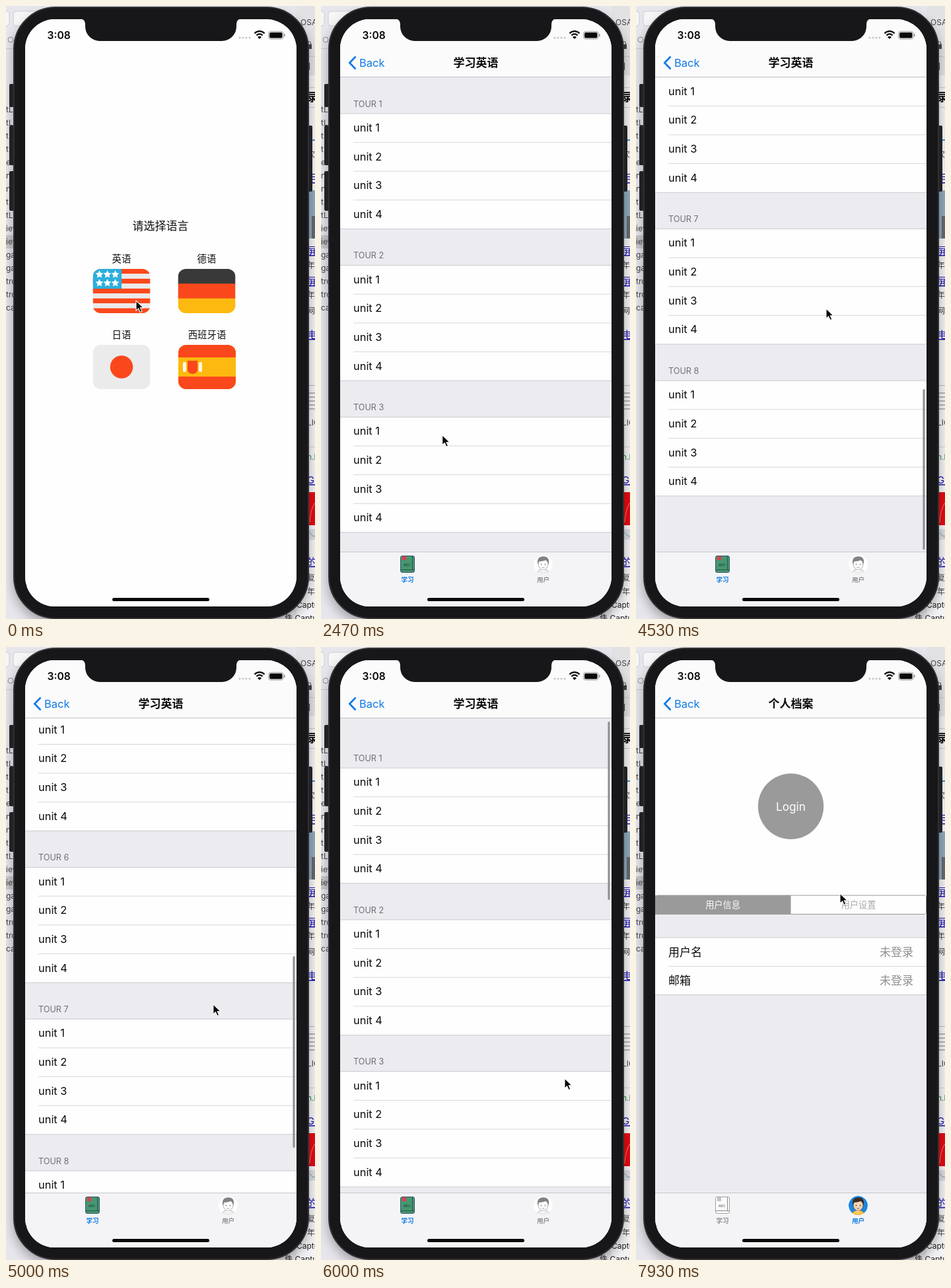
Write an HTML page that moves like this. It is 468 px wide and 928 px high and loops after 8000 ms.

```html
<!DOCTYPE html>
<html lang="zh">
<head>
<meta charset="utf-8">
<title>语言学习</title>
<style>
  html, body { margin: 0; width: 100%; height: 100%; overflow: hidden; background: #e6e6ec; }
  svg { display: block; width: 468px; height: 928px; font-family: Inter, "Noto Sans CJK SC", "Noto Sans CJK", sans-serif; }
  .mid { text-anchor: middle; }
  .end { text-anchor: end; }
  .cell { font-size: 16.4px; fill: #0c0c0c; }
  .head { font-size: 12.6px; fill: #6f6f74; }
  .title { font-size: 17px; font-weight: 700; fill: #0c0c0c; }
  .tab { font-size: 9.6px; font-weight: 700; }
  .side { font-size: 12px; fill: #444448; }
  .link { font-size: 15px; fill: #1a12b0; text-decoration: underline; }
</style>
</head>
<body>
<svg viewBox="0 0 468 928" xmlns="http://www.w3.org/2000/svg">
  <defs>
    <clipPath id="screenClip"><path d="M29 65a45 45 0 0 1 45-45H394a46 46 0 0 1 46 45V863a46 46 0 0 1-46 46H74a45 45 0 0 1-45-46Z"/></clipPath>
    <clipPath id="listClip"><rect x="29" y="108" width="411" height="718"/></clipPath>
    <clipPath id="flagClip"><rect width="87" height="67" rx="12"/></clipPath>
    <clipPath id="faceClip"><circle r="14.5"/></clipPath>
    <filter id="shadow" x="-20%" y="-10%" width="140%" height="120%"><feGaussianBlur stdDeviation="9"/></filter>
  </defs>
  <g id="desktop"></g>
  <g id="body"></g>
  <g clip-path="url(#screenClip)">
    <rect x="29" y="20" width="411" height="889" fill="#fefefe"/>
    <g id="home"></g>
    <g id="app">
      <rect x="29" y="20" width="411" height="889" fill="#ebebf0"/>
      <g id="study">
        <g clip-path="url(#listClip)">
          <g id="rows"></g>
          <rect id="bar" x="434.5" width="3" rx="1.5" fill="#8e8e90"/>
        </g>
      </g>
      <g id="profile"></g>
      <g id="chrome"></g>
    </g>
    <g id="status"></g>
  </g>
  <path id="cursor" d="M0 0V15.2L3.6 11.9L6.2 17.6L8.9 16.4L6.4 10.9H11.2Z" fill="#050505" stroke="#fff" stroke-width="1.1"/>
</svg>
<script>
const $ = id => document.getElementById(id);
const DURATION = 8000, PUSH_START = 400, PUSH_TIME = 500, TAB_SWITCH = 6900;
const SECTION = 229.75, ROW = 43.65, MAX_SCROLL = 1157;
const WHITE = '#fefefe', GROUP = '#ebebf0', BLACK = '#17171a', BLUE = '#0f7be4', GREY = '#8e8e92', BUTTON = '#9a9a9a', BORDER = '#cbcbcf';

const rect = (x, y, w, h, fill, extra = '') =>
  `<rect x="${x}" y="${y}" width="${w}" height="${h}" fill="${fill}" ${extra}/>`;
const text = (x, y, string, cls, extra = '') =>
  `<text x="${x}" y="${y}" class="${cls}" ${extra}>${string}</text>`;
const line = (x, y, color = '#d8d8db') => rect(x, y - .5, 440 - x, 1, color);

function drawDesktop() {
  const files = ['tLa', 'tLa', 'tLa', 'tLa', 'er', 'n', 'n', 'tLa', 'tLa', 'iew', 'iew', 'gar', 'gar', 'tro', 'tro', 'ca'];
  let out = rect(0, 0, 468, 928, '#e6e6ec')
    + rect(-8, 8, 13, 22, '#f6f6f7', 'rx="4" stroke="#cdcdd0"')
    + rect(11, 8, 40, 22, '#f6f6f7', 'rx="4" stroke="#cdcdd0"')
    + '<circle cx="7" cy="51" r="4" fill="none" stroke="#8c8c90"/>'
    + rect(0, 64, 30, 1, '#cacace') + rect(0, 347, 30, 20, '#c8c8cc')
    + files.map((name, i) => text(0, 161 + i * 20, name, 'side')).join('');
  out += rect(440, 0, 28, 928, '#f3f3f5') + rect(440, 0, 28, 105, '#e2e2e5')
    + text(446, 29, 'OSA', 'side')
    + rect(456, 58, 7, 7, '#444448') + '<path d="M457.5 58v-2a2 2 0 0 1 4 0v2" fill="none" stroke="#444448"/>'
    + rect(440, 76, 28, 1, '#cacace') + rect(440, 123, 28, 1, '#cacace') + rect(440, 153, 28, 1, '#cacace')
    + text(457, 95, ']', 'side') + text(456, 144, '录', 'title') + text(456, 229, '次', 'side')
    + rect(456, 202, 12, 2, '#3c87cb')
    + rect(459, 279, 9, 73, '#8fa9bd') + rect(463, 318, 5, 34, '#666a70');
  [[266, '用'], [376, '屏幕'], [422, '屏幕'], [503, '电'], [723, 'Gi'], [847, '的']]
    .forEach(([y, s]) => out += text(456, y, s, 'link'));
  [[397, '年0'], [442, '年C'], [466, '网站'], [635, 'LIC'], [870, '复'], [891, '年1']]
    .forEach(([y, s]) => out += text(456, y, s, 'side'));
  out += text(456, 687, 'n.b', 'side', 'style="fill:#23843c"')
    + rect(456, 574, 12, 1, '#b8b8bb')
    + [585, 591, 597, 603, 609].map(y => rect(457, y, 11, 2, '#b4b4b8')).join('')
    + rect(456, 667, 12, 1, '#d2d2d5')
    + rect(456, 736, 12, 50, '#e40b12') + '<path d="M460 782q1-20 8-30" fill="none" stroke="#f47f78"/>'
    + rect(459, 792, 9, 16, '#d9dce0') + '<path d="M460 797l4 5 4 1" fill="none" stroke="#7199b8"/>'
    + text(440, 911, 'Captu', 'side', 'style="fill:#222"')
    + text(422, 931, '件 Captu', 'side', 'style="fill:#222"');
  $('desktop').innerHTML = out;
}

function drawBody() {
  const button = (x, y, h) => rect(x, y, 8, h, '#222224', 'rx="2"');
  $('body').innerHTML = rect(12, 12, 446, 922, '#000', 'rx="62" opacity=".34" filter="url(#shadow)"')
    + button(5, 118, 35) + button(5, 181, 60) + button(5, 250, 60) + button(456, 181, 100)
    + rect(12, 2, 446, 925, BLACK, 'rx="63" stroke="#303034" stroke-width="2"');
}

function drawHome() {
  const RED = '#fa481c', GOLD = '#fdb90f', PALE = '#ebebeb';
  const star = (x, y) => {
    const points = Array.from({ length: 10 }, (_, i) => {
      const r = i % 2 ? 3 : 6.2, a = i * Math.PI / 5;
      return `${(x + r * Math.sin(a)).toFixed(1)},${(y - r * Math.cos(a)).toFixed(1)}`;
    });
    return `<polygon points="${points.join(' ')}" fill="${WHITE}"/>`;
  };
  const flag = (x, y, name, art) => text(x + 43.5, y - 10.5, name, 'mid', 'font-size="14.4" font-weight="500" fill="#111"')
    + `<g transform="translate(${x} ${y})" clip-path="url(#flagClip)">${art}</g>`;
  const stripes = Array.from({ length: 9 }, (_, i) => rect(0, i * 67 / 9, 87, 7.6, i % 2 ? PALE : RED)).join('');
  const stars = [9, 22].map(y => [10, 22, 34].map(x => star(x, y - .5)).join('')).join('');
  $('home').innerHTML = rect(29, 20, 411, 889, WHITE)
    + text(234, 339, '请选择语言', 'mid', 'font-size="17" fill="#111"')
    + flag(131.5, 398, '英语', stripes + rect(0, 0, 43.5, 30, '#2cafdc') + stars)
    + flag(260.5, 398, '德语', rect(0, 0, 87, 23, '#393939') + rect(0, 22.3, 87, 23, RED) + rect(0, 44.7, 87, 23, GOLD))
    + flag(131.5, 513, '日语', rect(0, 0, 87, 67, PALE) + `<circle cx="43.5" cy="33.5" r="17.3" fill="${RED}"/>`)
    + flag(261, 513, '西班牙语', rect(0, 0, 87, 67, GOLD) + rect(0, 0, 87, 19, RED) + rect(0, 48, 87, 19, RED)
      + rect(7, 26, 5, 15, '#fff6ea', 'rx="2"') + rect(31, 26, 5, 15, '#fff6ea', 'rx="2"')
      + `<path d="M14 24H29V38q0 5-7.5 6Q14 43 14 38Z" fill="${RED}"/>`);
}

function drawRows() {
  let out = '';
  for (let s = 0; s < 8; s++) {
    const top = 162.8 + s * SECTION;
    out += text(49, top - 10.3, `TOUR ${s + 1}`, 'head') + rect(29, top, 411, ROW * 4, WHITE)
      + line(29, top, BORDER) + line(29, top + ROW * 4, BORDER);
    for (let r = 0; r < 4; r++) {
      out += text(49, top + r * ROW + 27.1, `unit ${r + 1}`, 'cell');
      if (r) out += line(49, top + r * ROW);
    }
  }
  $('rows').innerHTML = out;
}

function drawProfile() {
  const row = (y, name) => text(49, y, name, 'cell', 'style="font-size:17px"')
    + text(420, y, '未登录', 'end', `font-size="17" fill="${GREY}"`);
  $('profile').innerHTML = rect(29, 108, 411, 297, WHITE)
    + `<circle cx="234.5" cy="241.3" r="49.7" fill="${BUTTON}"/>`
    + text(234.5, 247.5, 'Login', 'mid', `font-size="17.2" fill="${WHITE}"`)
    + rect(29.5, 376, 410, 28.5, WHITE, `rx="3" stroke="${BUTTON}"`) + rect(29, 376, 205.5, 29, BUTTON)
    + text(131.5, 395, '用户信息', 'mid', `font-size="13.2" fill="${WHITE}"`)
    + text(337, 395, '用户设置', 'mid', 'font-size="13.2" fill="#a6a6a6"')
    + rect(29, 440, 411, 86.5, WHITE) + line(29, 440, BORDER) + line(49, 483.5) + line(29, 526.5, BORDER)
    + row(467.5, '用户名') + row(511, '邮箱');
}

function bookIcon(active) {
  const [cover, edge, ink, mark] = active ? ['#469673', '#35566a', '#27573f', '#d9414a'] : ['#fafafa', '#a2a2a4', '#8a8a8c', '#c2c2c4'];
  return rect(120.5, 832.5, 21, 25, cover, `rx="2.5" stroke="${edge}"`)
    + rect(121, 853, 20, 1, ink) + rect(138, 833, 1, 21, ink)
    + rect(123, 833, 6, 6, mark)
    + text(130, 848, 'ABC', 'mid', `font-size="5" font-weight="700" fill="${ink}"`);
}

function faceIcon(active) {
  const [back, hair, skin, shirt, ink] = active
    ? ['#1c86e0', '#3a2b20', '#f8d5b4', '#f4c542', '#4f3c2c']
    : [WHITE, '#828284', WHITE, '#ededee', '#828284'];
  return `<g transform="translate(336.5 845.5)" clip-path="url(#faceClip)">
    <circle r="14.5" fill="${back}"/>
    <path d="M-10 15q1-8 10-8t10 8Z" fill="${shirt}" stroke="${ink}" stroke-width=".5"/>
    <path d="M-3 5h6v4l-3 2-3-2Z" fill="${skin}"/>
    <ellipse cy="-.3" rx="7.3" ry="8.2" fill="${skin}" stroke="${ink}" stroke-width=".6"/>
    <path d="M-8.3 0q-2-12 8.3-12.3T8.3 0Q7-5 4-6.5-3-4-6-5Q-7.5-3-8.3 0Z" fill="${hair}"/>
    <circle cx="-3" cy="0" r=".9" fill="${ink}"/><circle cx="3" cy="0" r=".9" fill="${ink}"/>
    <path d="M-2 4q2 1.6 4 0" fill="none" stroke="${ink}" stroke-width=".8"/></g>`;
}

function tabs(id, onProfile) {
  return `<g id="${id}">${text(234.5, 92, onProfile ? '个人档案' : '学习英语', 'title mid')}
    ${bookIcon(!onProfile)}${faceIcon(onProfile)}
    ${text(131, 871.5, '学习', 'tab mid', `fill="${onProfile ? GREY : BLUE}"`)}
    ${text(336.5, 871.5, '用户', 'tab mid', `fill="${onProfile ? BLUE : GREY}"`)}</g>`;
}

function drawChrome() {
  $('chrome').innerHTML = rect(29, 20, 411, 87.5, '#fbfbfc') + line(29, 107.5, '#c2c2c5')
    + rect(29, 826, 411, 83, '#f4f4f6') + line(29, 826.5, '#c6c6ca')
    + `<path d="M52.5 76.5L43.3 86L52.5 95.5" fill="none" stroke="${BLUE}" stroke-width="2.7"/>`
    + text(58, 91.5, 'Back', '', `font-size="16.5" fill="${BLUE}"`)
    + tabs('studyTabs', false) + tabs('profileTabs', true);
}

function drawStatus() {
  const arc = r => `<path d="M${384 - r * .75} ${49 - r * .75}A${r} ${r} 0 0 1 ${384 + r * .75} ${49 - r * .75}" fill="none" stroke="#080808" stroke-width="2.2"/>`;
  $('status').innerHTML = `<path d="M112 19q8 1 8 9V31a22 22 0 0 0 22 22H327a22 22 0 0 0 22-22V28q0-8 8-9Z" fill="${BLACK}"/>`
    + text(62.5, 50, '3:08', '', 'font-size="15.6" font-weight="600" fill="#080808"')
    + [354, 359, 364, 369].map(x => `<circle cx="${x}" cy="48" r="1.6" fill="#c8c8ca"/>`).join('')
    + arc(10) + arc(6) + '<path d="M384 50l-3-3q3-2.4 6 0Z" fill="#080808"/>'
    + rect(397.5, 38.5, 22.5, 11.5, 'none', 'rx="3.2" stroke="#9a9a9c"') + rect(399, 40, 19.5, 8.5, '#080808', 'rx="2"')
    + rect(421, 42, 1.6, 4.5, '#9a9a9c', 'rx=".8"')
    + rect(161, 896, 147, 5, '#080808', 'rx="2.5"');
}

// Each step: time, then the values reached at that time.
const CURSOR = [[0, 197, 446], [1900, 197, 446], [2900, 175, 782], [3780, 175, 782], [4050, 288, 458], [4560, 288, 458],
  [4800, 288, 340], [5030, 315, 550], [5300, 303, 333], [5380, 303, 333], [5640, 369, 653], [6050, 369, 653],
  [6650, 337, 846], [7150, 337, 846], [7880, 309, 373]];
// Drags and glides inside the list; the rebounds past its ends are added on top.
const SCROLL = [[3800, 0], [3920, 110], [4050, 322], [4245, 818], [4440, MAX_SCROLL], [4800, MAX_SCROLL],
  [4920, 1075], [5030, 941], [5170, 628], [5330, 354.5], [5390, 300], [5480, 220], [5640, 0]];
const REBOUNDS = [[4440, 1390], [5640, -2882]];
const BAR_FADE = [[3800, 0], [3860, 1], [6300, 1], [6550, 0]];

function sample(steps, t, ease = x => x) {
  const next = steps.findIndex(step => step[0] > t);
  if (next === 0) return steps[0].slice(1);
  if (next < 0) return steps[steps.length - 1].slice(1);
  const a = steps[next - 1], b = steps[next], k = ease((t - a[0]) / (b[0] - a[0]));
  return a.slice(1).map((v, i) => v + (b[i + 1] - v) * k);
}
const smooth = x => x * x * (3 - 2 * x);
const move = (id, x, y) => $(id).setAttribute('transform', `translate(${x.toFixed(2)} ${y.toFixed(2)})`);
const show = (id, visible) => $(id).setAttribute('visibility', visible ? 'visible' : 'hidden');

// Critically damped spring, started at the given speed in pixels per second.
function rebound(t, [start, speed]) {
  const s = Math.max(0, t - start) / 1000;
  return speed * s * Math.exp(-10.9 * s);
}

function render(t) {
  const progress = Math.min(1, Math.max(0, (t - PUSH_START) / PUSH_TIME));
  const push = 1 - (1 - progress) ** 4;
  move('home', -124 * push, 0);
  move('app', 411 * (1 - push), 0);
  show('home', progress < 1);

  const offset = REBOUNDS.reduce((sum, r) => sum + rebound(t, r), sample(SCROLL, t)[0]);
  move('rows', 0, -offset);
  const inside = Math.min(MAX_SCROLL, Math.max(0, offset));
  const length = 290 - Math.abs(offset - inside);
  const start = offset > MAX_SCROLL ? 823 - length : 113 + 420 * inside / MAX_SCROLL;
  $('bar').setAttribute('y', start);
  $('bar').setAttribute('height', length);
  $('bar').setAttribute('opacity', sample(BAR_FADE, t)[0]);

  const onProfile = t >= TAB_SWITCH;
  show('study', !onProfile);
  show('studyTabs', !onProfile);
  show('profile', onProfile);
  show('profileTabs', onProfile);
  move('cursor', ...sample(CURSOR, t, smooth));
}

[drawDesktop, drawBody, drawHome, drawRows, drawProfile, drawChrome, drawStatus].forEach(draw => draw());
const begin = performance.now();
function tick() {
  render((performance.now() - begin) % DURATION);
  requestAnimationFrame(tick);
}
tick();
</script>
</body>
</html>
```
